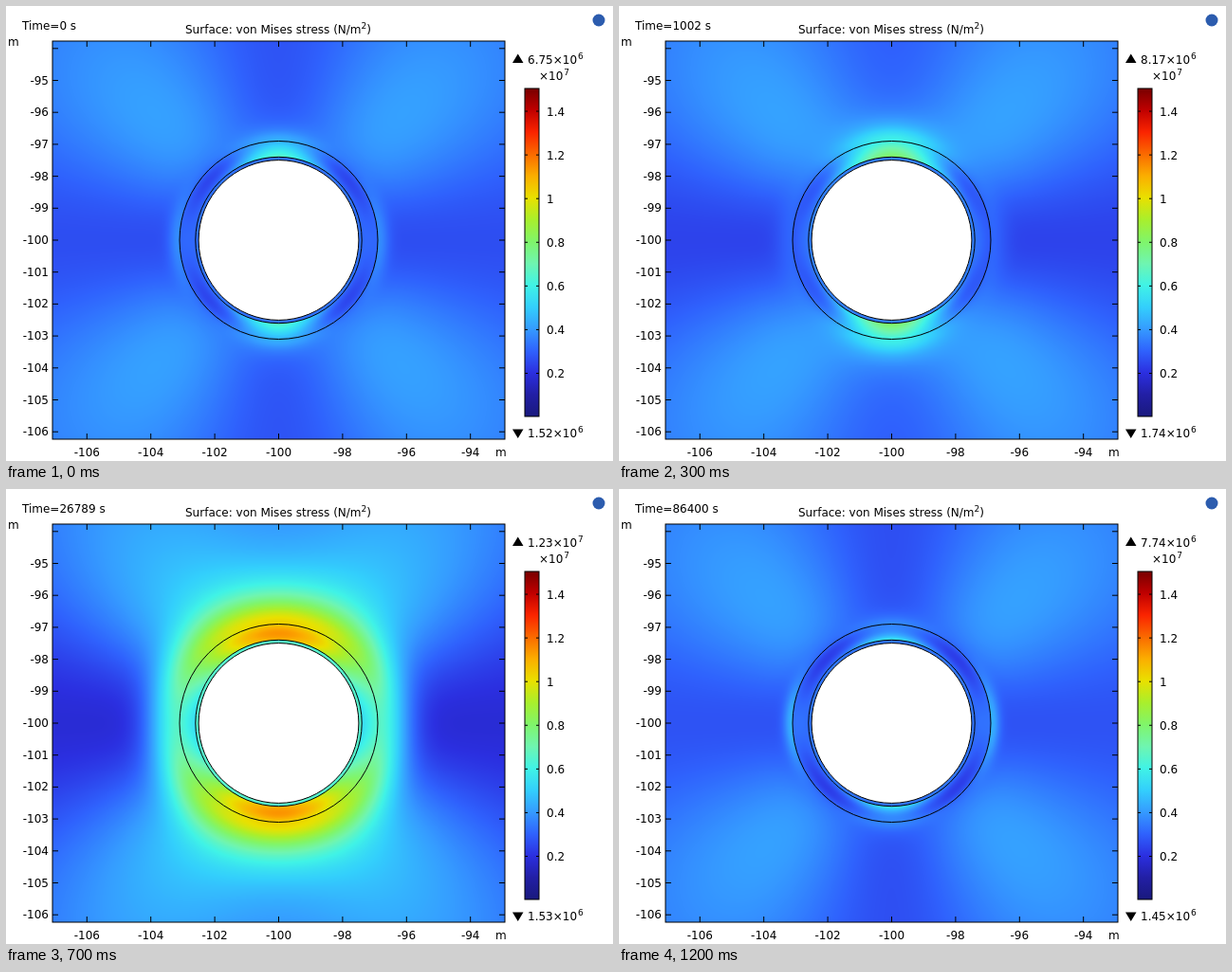
These frames come from a looping animation (640x480 px, 1.25 s). An HTML page with a canvas:

```html
<!DOCTYPE html>
<html lang="en">
<head>
<meta charset="utf-8">
<title>Von Mises stress</title>
<style>
  html, body { margin: 0; width: 100%; height: 100%; overflow: hidden; background: #fff; }
  canvas { position: absolute; left: 49px; top: 37px; }
  svg { position: absolute; left: 0; top: 0; }
  text { font: 12px "DejaVu Sans", sans-serif; fill: #000; white-space: pre; }
  .sup { font-size: 9px; }
  .line { fill: none; stroke: #000; stroke-width: 1; }
</style>
</head>
<body>
<canvas id="field" width="477" height="420"></canvas>
<svg id="plot" width="640" height="480" viewBox="0 0 640 480">
  <defs><linearGradient id="scale" x1="0" y1="1" x2="0" y2="0"></linearGradient></defs>
  <circle cx="287.5" cy="247" r="84.5" fill="#fff"/>
  <rect x="547" y="87" width="15" height="346" fill="url(#scale)"/>
  <g class="line">
    <circle cx="287.5" cy="247" r="84.4"/>
    <circle cx="287.5" cy="247" r="87.7"/>
    <circle cx="287.5" cy="247" r="104.5"/>
    <rect x="49" y="37" width="477" height="420"/>
    <rect x="547" y="87" width="15" height="346"/>
    <path id="ticks"/>
  </g>
  <path d="M534 60h11.5l-5.75 -9.5zM534 446.5h11.5l-5.75 9.5z"/>
  <circle cx="625" cy="15" r="6.5" fill="#2c5cae"/>
  <text id="time" x="17" y="25"></text>
  <text x="189" y="29">Surface: von Mises stress (N/m<tspan class="sup" dy="-5">2</tspan><tspan dy="5">)</tspan></text>
  <text x="2" y="42">m</text>
  <text x="516" y="475">m</text>
  <text x="562" y="78">×10<tspan class="sup" dx="1" dy="-5">7</tspan></text>
  <text x="550" y="61"><tspan id="max"></tspan><tspan id="maxExp" class="sup" dx="1" dy="-5"></tspan></text>
  <text x="550" y="455"><tspan id="min"></tspan><tspan id="minExp" class="sup" dx="1" dy="-5"></tspan></text>
</svg>
<script>
const $ = id => document.getElementById(id);
const NS = 'http://www.w3.org/2000/svg';
const STEPS = 25, STEP_MS = 50;
const W = 477, H = 420, QW = 239, QH = 210;
const R_LINER = 87.7, R_ROCK = 104.5, METRE = 33.7;

const RAINBOW = ('19197d 221fa5 2b2fe0 2f62fd 359bff 33cffc 40f3e6 6ff5b0 ' +
  '80f56a a9ef2c e9e000 fbae00 fa6a00 fa2400 c00000 780000').split(' ');

// Gas pressure drives load, cooling of the cavern wall drives chill.
const KEYS = [
  { step: 0, sec: 0, max: 6.75, min: 1.52, load: 0, chill: 0 },
  { step: 4, sec: 414.29, max: 8.16, min: 1.78, load: 0.25, chill: 0 },
  { step: 8, sec: 2423.4, max: 8.19, min: 1.63, load: 0.28, chill: 0 },
  { step: 12, sec: 18497, max: 12.5, min: 1.54, load: 1, chill: 0 },
  { step: 17, sec: 46691, max: 11.8, min: 1.52, load: 0.93, chill: 1 },
  { step: 19, sec: 55470, max: 5.93, min: 0.364, load: 0.1, chill: 0.95 },
  { step: 24, sec: 86400, max: 7.74, min: 1.45, load: -0.12, chill: 0 }
];

const mix = (a, b, f) => a + (b - a) * f;
const clamp = (x, lo, hi) => Math.max(lo, Math.min(hi, x));

const stops = RAINBOW.map(hex => [0, 2, 4].map(i => parseInt(hex.substr(i, 2), 16)));
const LUT = Array.from({ length: 1501 }, (_, n) => {
  const a = Math.min(14, Math.floor(n / 100)), f = n / 100 - a;
  const [r, g, b] = stops[a].map((c, i) => Math.round(mix(c, stops[a + 1][i], f)));
  return (255 << 24 | b << 16 | g << 8 | r) >>> 0;
});

// Stress in MPa at (x, y) pixels from the centre.
function stressField({ load, chill, sec }) {
  const age = clamp((sec - 30000) / 15000, 0, 1);
  const spare = 1 - load;
  const side = 2.6 - 0.8 * load, crown = 2.7 + 0.7 * load;
  const halo = 1.7 + 5.3 * load, wall = 1.2 - 4 * load + 7.8 * load * load;
  const reach = 12 + 22 * load, focus = 1 + 3 * spare * spare;
  const inSide = 3.1 + 3.7 * load * load - 4.5 * chill;
  const inCrown = 6.6 + 5.7 * load - 4.5 * chill;
  const falloff = 1 + 2 * age, bulge = 0.5 * load + chill;
  const liner = 3.3 + 3.3 * load * load;

  return (x, y) => {
    const r = Math.hypot(x, y);
    if (r < R_LINER) return liner;
    const v = y * y / (r * r), h = 1 - v, q = 4 * v * h;
    const vk = v ** focus, hk = h ** focus;
    const d = Math.max(r, R_ROCK), u = (d - R_ROCK) / reach;
    const lobe = Math.exp(-(((d - 170) / 220) ** 2)) * (1 - (100 / d) ** 6);
    const far = mix(side, crown, v) + 1.5 * q * lobe + halo * vk / (1 + u * u);
    if (r >= R_ROCK) return far + wall * hk * Math.exp(-u * u);

    const p = (r - R_LINER) / (R_ROCK - R_LINER), mid = 4 * p * (1 - p);
    const outer = far + wall * hk * mix(0.4, 1, load);
    const inner = Math.hypot(mix(inSide, inCrown, vk), 0.4);
    return mix(outer, inner, (1 - p) ** falloff) + mid * (bulge * vk - 0.7 * spare * q);
  };
}

const ctx = $('field').getContext('2d');
const image = ctx.createImageData(W, H);
const pixels = new Uint32Array(image.data.buffer);

// The field is symmetric, so one quarter is computed and mirrored.
function paint(stress) {
  for (let j = 0; j < QH; j++) {
    const up = (QH - 1 - j) * W + QW - 1, down = (QH + j) * W + QW - 1;
    for (let i = 0; i < QW; i++) {
      const c = LUT[clamp(Math.round(stress(i, j + 0.5) * 100), 0, 1500)];
      pixels[up + i] = pixels[up - i] = pixels[down + i] = pixels[down - i] = c;
    }
  }
  ctx.putImageData(image, 0, 0);
}

// The solver's time steps grow geometrically.
function clock(step, a, b) {
  if (step === a.step) return a.sec;
  if (!a.sec) return b.sec * 2 ** (step - b.step);
  return a.sec * (b.sec / a.sec) ** ((step - a.step) / (b.step - a.step));
}

function stateAt(step) {
  const n = Math.max(1, KEYS.findIndex(k => k.step >= step));
  const a = KEYS[n - 1], b = KEYS[n];
  const sec = clock(step, a, b), f = (sec - a.sec) / (b.sec - a.sec);
  const state = {};
  for (const name in a) state[name] = mix(a[name], b[name], f);
  return state;
}

function setValue(id, mega) {
  const e = Math.floor(Math.log10(mega) + 1e-9);
  $(id).textContent = (mega / 10 ** e).toFixed(2) + '×10';
  $(id + 'Exp').textContent = e + 6;
}

function show(step) {
  const state = stateAt(step);
  paint(stressField(state));
  $('time').textContent = `Time=${Number(state.sec.toPrecision(5))} s`;
  setValue('max', state.max);
  setValue('min', state.min);
}

function add(parent, tag, attrs, text = '') {
  const el = document.createElementNS(NS, tag);
  for (const name in attrs) el.setAttribute(name, attrs[name]);
  el.textContent = text;
  $(parent).append(el);
}

function label(text, x, y, anchor) {
  add('plot', 'text', { x, y, 'text-anchor': anchor }, text);
}

function buildAxes() {
  let d = '';
  for (let m = -106; m <= -94; m++) {
    const x = 287.5 + (m + 100) * METRE, y = 247 - (m + 100) * METRE;
    d += `M49 ${y}h6M526 ${y}h-6`;
    if (m < -94) label(m, 45, Math.round(y + 4), 'end');
    if (m % 2) continue;
    d += `M${x} 37v6M${x} 457v-6`;
    label(m, x, 475, 'middle');
  }
  for (let n = 1; n <= 7; n++) {
    const y = 433.6 - n * 46.08;
    d += `M547 ${y}h3M562 ${y}h-3`;
    label(n / 5, 570, Math.round(y + 4.5), 'start');
  }
  $('ticks').setAttribute('d', d);
  RAINBOW.forEach((c, i) => add('scale', 'stop', { offset: i / 15, 'stop-color': '#' + c }));
}

buildAxes();
show(0);
const start = performance.now();
let last = 0;
function tick() {
  const step = Math.floor((performance.now() - start) / STEP_MS) % STEPS;
  if (step !== last) show(last = step);
  requestAnimationFrame(tick);
}
requestAnimationFrame(tick);
</script>
</body>
</html>
```
